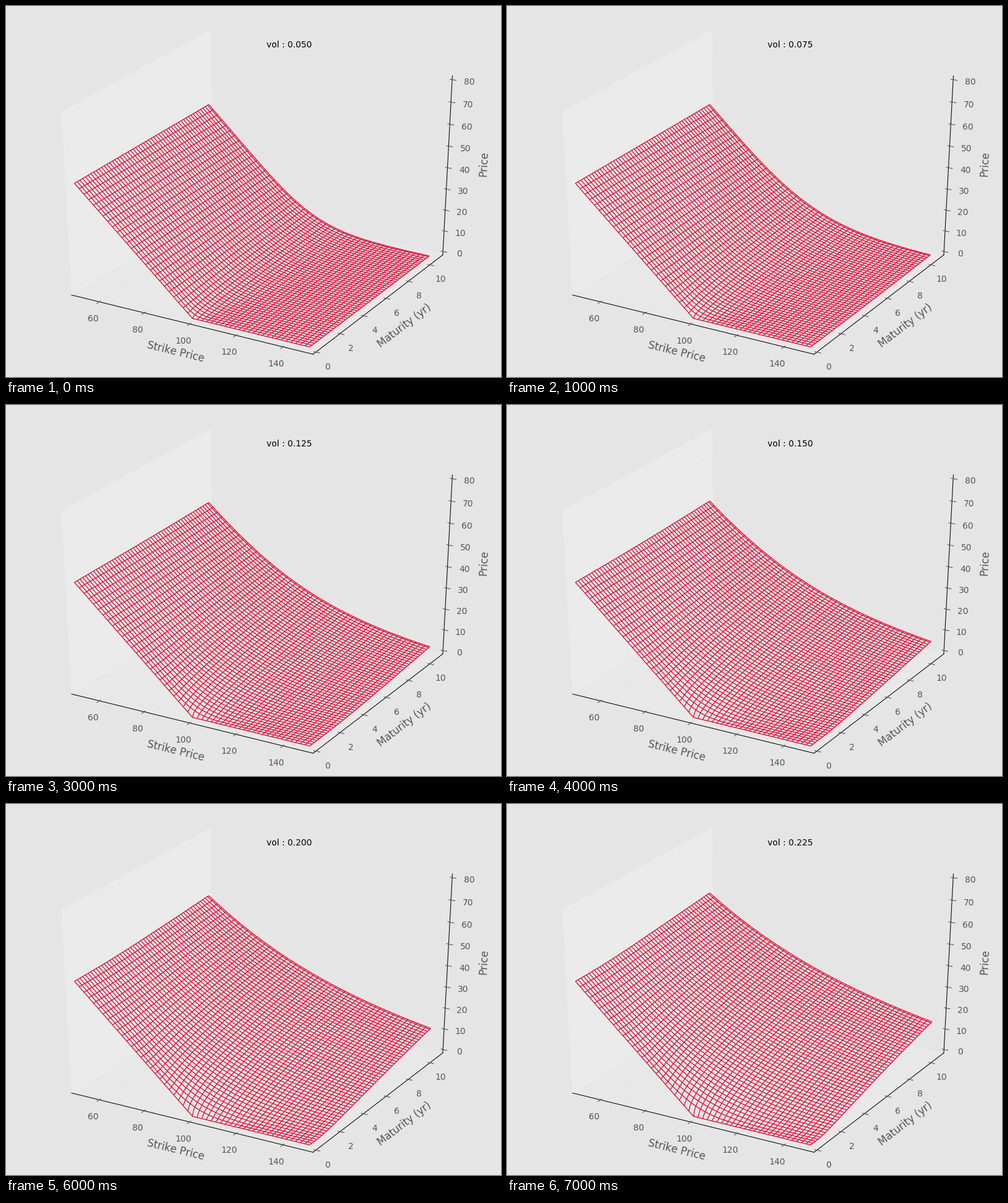
A matplotlib script for the animation above (8000 ms loop, 800x600 px).

```python
import math

import matplotlib.pyplot as plt
import numpy as np
from matplotlib.animation import FuncAnimation

GREY = "#e5e5e5"
INK = "#555555"
SPOT = 100
FRAMES = 8

plt.rcParams.update({
    "font.family": "DejaVu Sans",
    "font.size": 10,
    "text.kerning_factor": 6,
    "figure.facecolor": GREY,
    "axes.facecolor": GREY,
    "axes.edgecolor": "black",
    "axes.linewidth": 0.75,
    "axes.labelsize": 12,
    "axes.labelcolor": INK,
    "axes.labelpad": 5,
    "axes.grid": True,
    "grid.color": GREY + "55",
    "grid.linewidth": 0.8,
    "xtick.color": INK,
    "ytick.color": INK,
    "patch.linewidth": 0.5,
})

norm_cdf = np.vectorize(lambda v: 0.5 * (1 + math.erf(v / math.sqrt(2))))

strike, years = np.meshgrid(np.linspace(50, 150, 101),
                            np.linspace(0, 10.5, 106))


def call_price(vol):
    """Black-Scholes call with a zero interest rate."""
    spread = vol * np.sqrt(np.maximum(years, 1e-6))
    d1 = np.log(SPOT / strike) / spread + spread / 2
    return SPOT * norm_cdf(d1) - strike * norm_cdf(d1 - spread)


def padded(low, high):
    margin = (high - low) / 48
    return low - margin, high + margin


fig = plt.figure(figsize=(8, 6), dpi=100)
ax = fig.add_axes([0, 0, 1, 1], projection="3d")
# Let the box stretch with the figure instead of forcing a square.
ax.apply_aspect = lambda position=None: None
ax.set_box_aspect((1, 1, 1), zoom=math.sqrt(3) / 1.8294640721620434)
ax.view_init(elev=30, azim=-60)

ax.set_xlim(*padded(49.5, 150.5))
ax.set_ylim(*padded(0, 11))
ax.set_zlim(*padded(0, 80))
ax.set_xticks(range(60, 141, 20))
ax.set_yticks(range(0, 11, 2))
ax.set_zticks(range(0, 81, 10))
ax.tick_params(pad=4)
ax.set_xlabel("Strike Price")
ax.set_ylabel("Maturity (yr)")
ax.set_zlabel("Price")

caption = fig.text(421 / 800, 533 / 600, "", color="black")
wires = []


def draw(i):
    vol = 0.05 + 0.025 * i
    while wires:
        wires.pop().remove()
    # Every second grid line, plus the last one at 10.5 years.
    wires.append(ax.plot_wireframe(strike, years, call_price(vol),
                                   rstride=2, cstride=2,
                                   color="crimson", linewidth=1))
    caption.set_text(f"vol : {vol:.3f}")
    return wires + [caption]


anim = FuncAnimation(fig, draw, frames=FRAMES, interval=1000,
                     init_func=lambda: draw(0), repeat=True)
plt.show()
```
